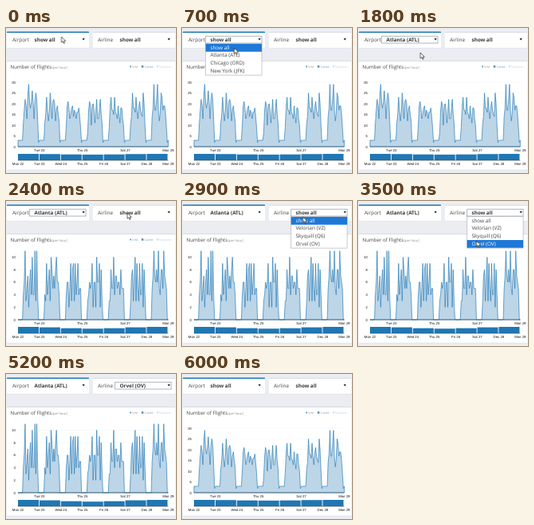
Animation, 213 px wide and 182 px high, one loop 6.1 s. Source, as an HTML page:

```html
<!DOCTYPE html>
<html lang="en">
<head>
<meta charset="utf-8">
<title>Flights dashboard</title>
<style>
html, body { margin: 0; width: 100%; height: 100%; overflow: hidden; background: #ecedf2; }
svg { display: block; width: 213px; height: 182px; }
text { font: 6.4px "Open Sans", sans-serif; fill: #444; text-rendering: geometricPrecision; }
.bold { font-weight: 700; font-size: 6.4px; fill: #383838; }
.title { font-size: 6.2px; }
.note { font-size: 4.1px; fill: #888; }
.tool { font-size: 3.8px; fill: #7f9db5; }
.off { opacity: .5; }
.axis text { font: 4.3px "Liberation Sans", Arial, sans-serif; fill: #111; }
.days text { text-anchor: middle; }
.y text { text-anchor: end; }
.card, .light { fill: #fff; }
.page { fill: #ecedf2; }
.edge { fill: #dcdfe6; }
.area { fill: #bcd5e7; stroke: #1f77b4; stroke-width: .65; stroke-linejoin: round; }
.bar { fill: #1f77b4; }
.focus { fill: none; stroke: #8a96a0; stroke-width: .7; }
.list { fill: #fff; stroke: #a4a9ae; stroke-width: .6; }
.hot { fill: #1e78d7; }
.timed { animation: 6100ms step-end infinite; }
.pick1 { animation-name: pick1; }
.pick2 { animation-name: pick2; }
@keyframes pick1 { 0%, 100% { transform: none } 14.5% { transform: translateY(9.7px) } }
@keyframes pick2 {
  0%, 100% { transform: none }
  50.8% { transform: translateY(9.7px) }
  53% { transform: translateY(19.4px) }
  55.5% { transform: translateY(29.1px) }
}
.cursor { fill: #fff; stroke: #222; stroke-width: .7; animation: pointer 6100ms linear infinite; }
@keyframes pointer {
  0% { transform: translate(69.5px, 11px) }
  4.5%, 8.2% { transform: translate(67px, 14px) }
  11.48% { transform: translate(65.5px, 25px) }
  17%, 22% { transform: translate(64px, 35px) }
  29.51% { transform: translate(78px, 31px) }
  39.34%, 46% { transform: translate(152px, 15px) }
  57.38%, 63% { transform: translate(148.5px, 50px) }
  70.5%, 100% { transform: translate(160px, 190px) }
}
</style>
</head>
<body>
<svg viewBox="0 0 213 182" id="stage"></svg>
<script>
const LOOP = 6100, RESET = 5500;
const LEFT = 15, RIGHT = 203.3, DAY = 26.9, BASE = 149, ROW = 9.7;

// when each part is visible, in ms; a reversed pair means hidden in between
const cues = {
  menu1: [500, 1300], focus1: [500, 2800], chosen1: [1300, RESET], start1: [RESET, 1300],
  menu2: [2800, 3800], focus2: [2800, RESET], chosen2: [3800, RESET], start2: [RESET, 3800],
  atl: [2100, RESET], all: [RESET, 2100]
};
const cueStyle = Object.entries(cues).map(([name, [on, off]]) => {
  const pc = ms => (ms / LOOP * 100).toFixed(2) + "%";
  const rest = on < off ? 0 : 1;
  return `.${name} { animation-name: ${name} }
    @keyframes ${name} { 0%, 100% { opacity: ${rest} } ${pc(on)} { opacity: 1 } ${pc(off)} { opacity: 0 } }`;
}).join("\n");
document.head.append(Object.assign(document.createElement("style"), { textContent: cueStyle }));

const text = (x, y, s, cls = "") => `<text x="${x}" y="${y}" class="${cls}">${s}</text>`;
const rect = (x, y, w, h, cls, r = 0) =>
  `<rect x="${x}" y="${y}" width="${w}" height="${h}" rx="${r}" class="${cls}"/>`;
const line = (x1, x2, y, color, w = .5) =>
  `<path d="M${x1} ${y}H${x2}" stroke="${color}" stroke-width="${w}"/>`;
const group = (cls, body, extra = "") => `<g class="${cls}" ${extra}>${body}</g>`;
const clamp = (v, lo, hi) => Math.max(lo, Math.min(hi, v));

function random(seed) {
  return () => (seed = (seed * 16807) % 2147483647) / 2147483647;
}

// busy from early morning to late evening in waves, quieter in midweek
function flights({ night, peak, dip, mid, swing, period, noise, seed }) {
  const rnd = random(seed);
  return Array.from({ length: 169 }, (_, i) => {
    const h = i % 24, day = Math.floor(i / 24);
    const open = clamp((h - 5) / 1.5, 0, 1) * clamp((23 - h) / 1.5, 0, 1);
    const week = 1 - dip * Math.sin(Math.PI * day / 6);
    const wave = mid + swing * Math.cos((h - 8) / period * 2 * Math.PI) + noise * (rnd() - .5);
    return Math.round(clamp(night * (1 - h / 60) + open * peak * week * wave, 0, peak));
  });
}

function chart(values, unit, step, top, sag) {
  let s = "";
  for (let v = 0; v <= top; v += step) {
    const y = BASE - v * unit;
    s += line(LEFT, RIGHT, y, "#eef0f2", .4) + group("axis y", text(12, y + 1.5, v));
  }
  const pts = values.map((v, i) => `${(LEFT + i * DAY / 24).toFixed(2)} ${(BASE - v * unit).toFixed(2)}`);
  s += `<path class="area" d="M${LEFT} ${BASE}L${pts.join("L")}V${BASE}Z"/>`;
  for (let d = 0; d < 7; d++) {
    const y = 158 + sag * Math.sin(Math.PI * d / 6) ** 2;
    s += rect(LEFT + d * DAY, y, DAY - .9, 166 - y, "bar");
  }
  return s;
}

function dayAxis(y, step) {
  let s = "";
  for (let d = step - 1; d <= 7; d += step) {
    const name = ["Mon", "Tue", "Wed", "Thu", "Fri", "Sat", "Dec"][d % 7];
    s += text(LEFT + d * DAY, y, `${name} ${22 + d}`);
  }
  return group("axis days", s);
}

function card(x, y, w, h, edge) {
  return rect(x, y, w, h, "card", 1) + rect(x, y, w, 1.5, edge, .6) + line(x, x + w, y + h + .2, "#d8dae0");
}

function select(x, label, choice, n) {
  return text(x - 22, 17.4, label) +
    text(x + 5.5, 17.4, "show all", `bold timed start${n}`) +
    text(x + 5.5, 17.4, choice, `bold timed chosen${n}`) +
    `<path d="M${x + 65.5} 13h3.2l-1.6 2.6z" fill="#222"/>` +
    rect(x - .3, 10.2, 70.3, 8.8, `focus timed focus${n}`);
}

function menu(x, rows, n) {
  const labels = cls => rows.map((r, i) => text(x + 6, 26.6 + i * ROW, r, cls)).join("");
  return `<clipPath id="row${n}">${rect(x, 20, 70.6, ROW, `timed pick${n}`)}</clipPath>` +
    group(`timed menu${n}`,
      rect(x, 19.6, 70.6, 39.5, "list") + labels("") +
      group("", rect(x, 20, 70.6, 39, "hot") + labels("light"), `clip-path="url(#row${n})"`));
}

const heading =
  text(5.5, 51, "Number of Flights", "title") + text(57.8, 51, "(per hour)", "note") +
  '<circle cx="156" cy="48.4" r="1.1" fill="#7f9db5"/>' + text(158.3, 49.8, "Info", "tool") +
  '<rect x="169.7" y="47.1" width="2.6" height="2.6" fill="#5d8fb5"/>' + text(173.6, 49.8, "Cache", "tool") +
  '<circle cx="190" cy="48.2" r="1" fill="none" stroke="#a9bfd0" stroke-width=".5"/>' +
  text(192, 49.8, "Unzoom", "tool off");

const everyAirport = flights({ night: 3.4, peak: 32, dip: .24, mid: .54, swing: .14, period: 4, noise: .3, seed: 71 });
const oneAirport = flights({ night: 0, peak: 11, dip: .2, mid: .66, swing: .24, period: 2.7, noise: .5, seed: 29 });

document.getElementById("stage").innerHTML =
  rect(0, 0, 213, 182, "page") +
  card(1, 4.5, 103, 20.5, "bar") + card(109, 4.5, 103, 20.5, "edge") + card(1, 40.5, 211, 137.5, "edge") +
  heading +
  group("timed all", chart(everyAirport, 2.7, 5, 30, .9)) +
  group("timed atl", chart(oneAirport, 7.85, 2, 10, 2.2)) +
  line(LEFT, RIGHT, BASE, "#333") + line(LEFT, RIGHT, 166.2, "#333") +
  dayAxis(155.2, 2) + dayAxis(172, 1) +
  select(30, "Airport", "Atlanta (ATL)", 1) +
  select(137, "Airline", "Orvel (OV)", 2) +
  menu(29.4, ["show all", "Atlanta (ATL)", "Chicago (ORD)", "New York (JFK)"], 1) +
  menu(136.4, ["show all", "Velorian (VZ)", "Skyquill (Q6)", "Orvel (OV)"], 2) +
  '<path class="cursor" d="M0 0V7.2L1.7 5.7L2.9 8.3L4.1 7.8L3 5.2H5.2Z"/>';
</script>
</body>
</html>
```
